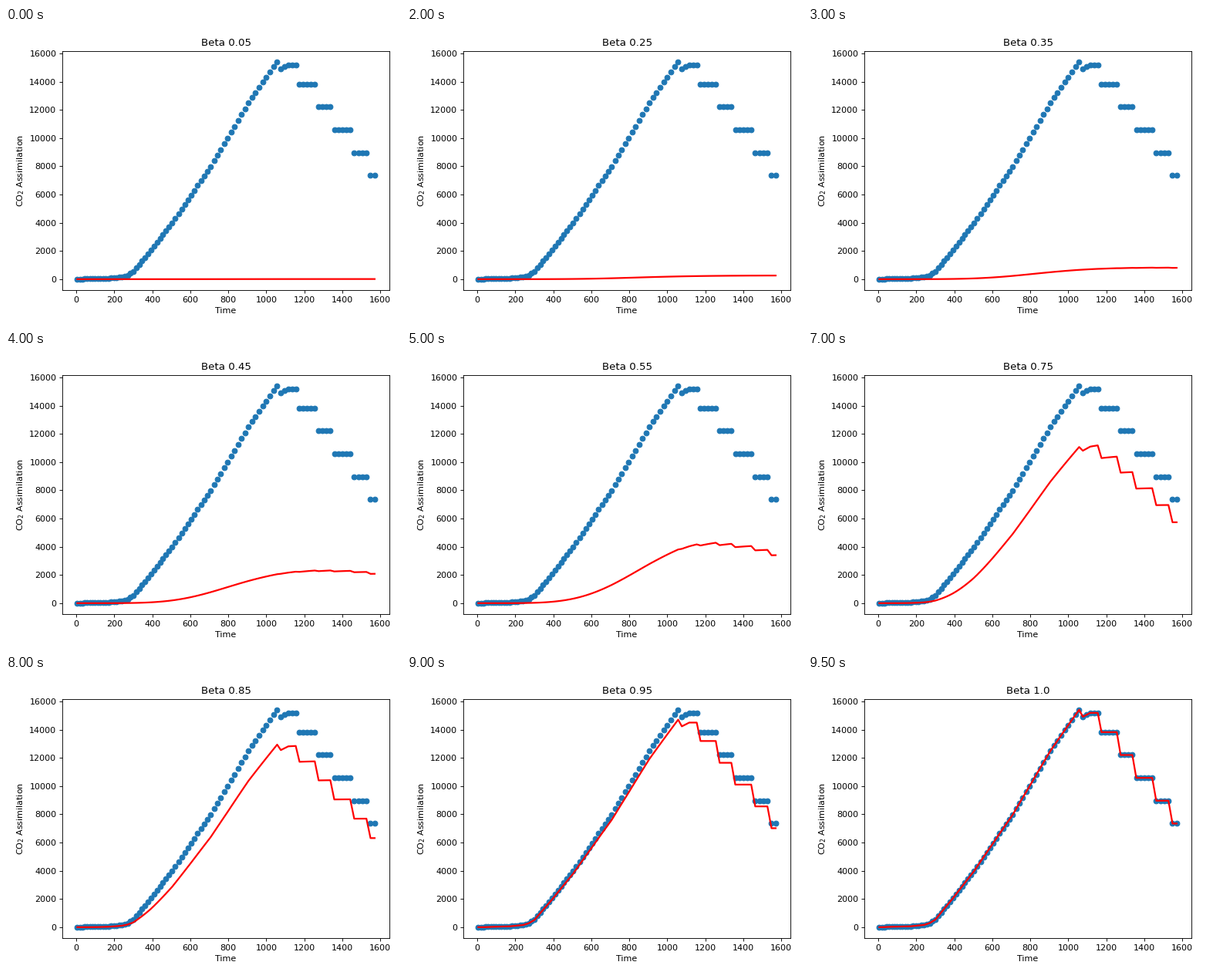
Write a matplotlib script that moves like this. It is 512 by 384 pixels and loops after 10 s.

```python
import numpy as np
import matplotlib.pyplot as plt
from matplotlib.animation import FuncAnimation

FRAMES, INTERVAL = 20, 500
HEIGHT, DPI = 384, 80

# Samples drift slowly apart in time.
step = np.arange(91)
time = 5 + 13.05 * step + 0.0482 * step**2

# Measured series: slow start, near-linear rise, then a falling staircase.
rise_step, rise_level = zip(
    (0, 8), (12, 60), (17, 160), (19, 290), (21, 540), (27, 2050), (34, 3990),
    (40, 5960), (46, 7980), (51, 10000), (57, 12500), (65, 15420),
    (66, 14920), (68, 15200))
stair = 13830 - 1620 * np.floor((step - 71) / 4.5)
measured = np.where(step < 71, np.interp(step, rise_step, rise_level), stair)

# How the capacity limit of the model depends on beta.
BETA_KEYS = (0.05, 0.25, 0.45, 0.65, 0.75, 0.85, 1.0)
LOG_CAPACITY = (2.3, 5.65, 8.13, 10.02, 12.6, 14.0, 20.0)
HALF_TIME = (900, 900, 870, 1030, 1180, 1180, 1180)


def model(beta):
    """Harmonic blend of a share of the measured series and a capacity."""
    share = max(0.8, 0.1 + 0.9 * beta)
    half_time = np.interp(beta, BETA_KEYS, HALF_TIME)
    limit = np.exp(np.interp(beta, BETA_KEYS, LOG_CAPACITY))
    capacity = limit / (1 + (half_time / time)**5)
    return 1 / (1 / (share * measured) + 1 / capacity)


fig, ax = plt.subplots(figsize=(6.4, HEIGHT / DPI), dpi=DPI)
ax.scatter(time, measured)
line, = ax.plot(time, measured, "r", lw=2)
title = ax.set_title("Beta 0.05")
ax.set_xlabel("Time")
ax.set_ylabel("CO$_2$ Assimilation")
fig.tight_layout()
fig.subplots_adjust(top=fig.subplotpars.top - 1 / HEIGHT)


def update(frame):
    beta = round(0.05 * (frame + 1), 2)
    line.set_ydata(model(beta))
    title.set_text(f"Beta {beta}")
    return line, title


anim = FuncAnimation(fig, update, frames=FRAMES, interval=INTERVAL,
                     repeat=True, repeat_delay=0)
plt.show()
```
